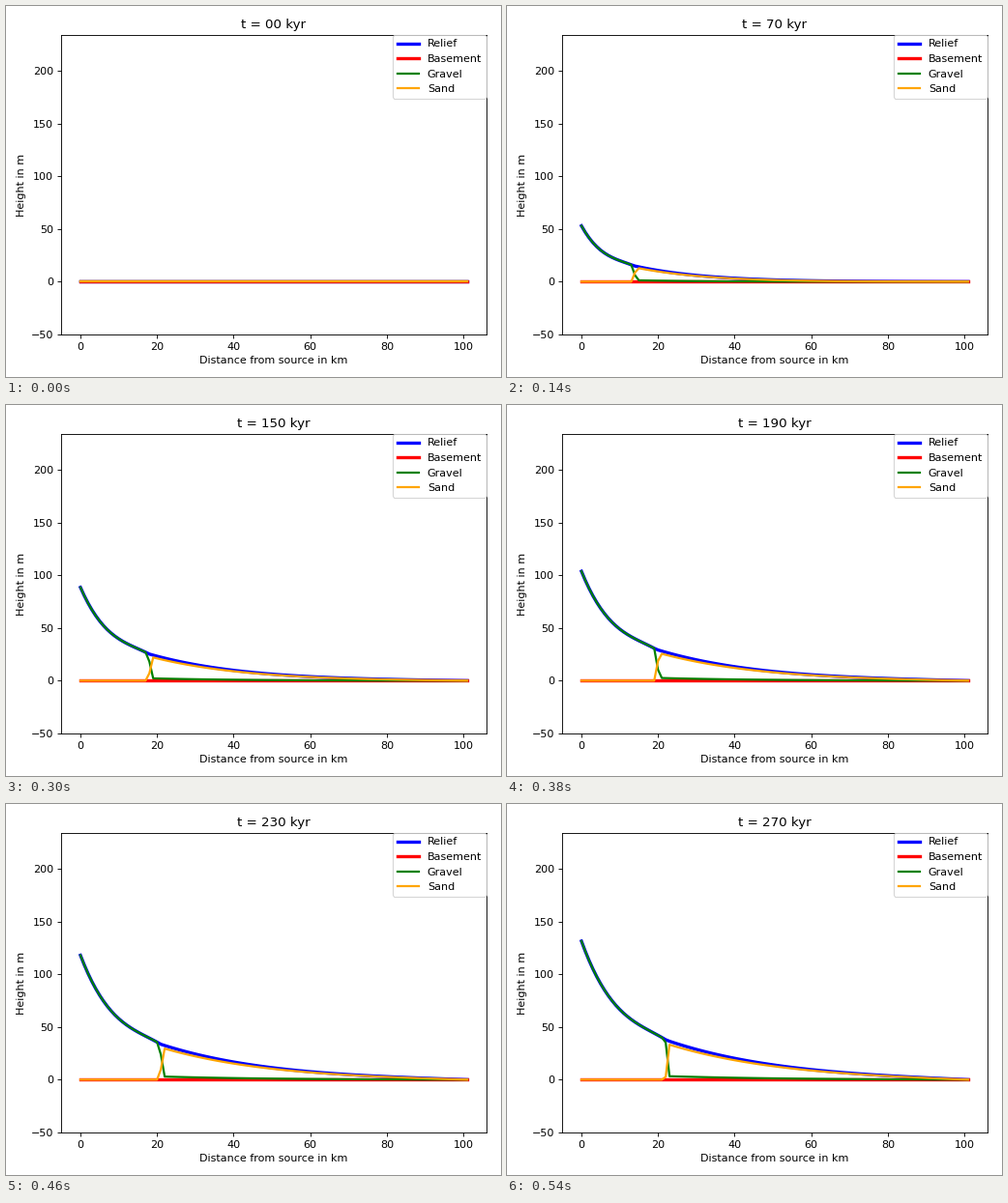
Animation of 512 by 384 pixels, one loop 560 ms. Source, as a matplotlib script:

```python
import matplotlib.pyplot as plt
import numpy as np
from matplotlib.animation import FuncAnimation

W, H, DPI = 512, 384, 80
FRAMES, INTERVAL = 28, 20
KYR_PER_FRAME = 10
LENGTH = 101            # km
TAIL = 0.09             # gravel share downstream of the front

plt.rcParams["font.family"] = "DejaVu Sans"
x = np.arange(LENGTH + 1.0)


def profile(xi):
    """Self-similar relief: steep gravel wedge, then a flatter sand apron."""
    wedge = 1 - 1.7 * xi + 1.635 * xi**2 - 0.65 * xi**3
    d = np.maximum(xi - 1, 0)
    apron = 0.285 * np.exp(-0.74 * d - 0.025 * d**2)
    return np.where(xi < 1, wedge, apron)


def layers(t):
    """Relief, gravel and sand heights in m after t kyr."""
    if t == 0:
        zero = np.zeros_like(x)
        return zero, zero, zero
    crest = 53 * (t / 70) ** 0.673
    front = 14.35 * (t / 70) ** 0.347
    reach = front - 0.7
    # the mirrored term holds the far end at zero
    relief = crest * (profile(x / reach) - profile((2 * LENGTH - x) / reach))
    filled = np.clip(front - x, 0, 1)
    share = filled + (1 - filled) * TAIL
    return relief, relief * share, relief * (1 - share)


fig = plt.figure(figsize=(W / DPI, H / DPI), dpi=DPI)
ax = fig.add_axes([57 / W, 44.1 / H, 440 / W, 309.9 / H])
ax.set_xlim(-0.05 * LENGTH, 1.05 * LENGTH)
ax.set_ylim(-50, 234)
ax.set_xlabel("Distance from source in km")
ax.set_ylabel("Height in m")
title = ax.set_title("t = 00 kyr")

flat = np.zeros_like(x)
relief_line, = ax.plot(x, flat, color="blue", lw=3, label="Relief")
ax.plot(x, flat, color="red", lw=3, label="Basement")
gravel_line, = ax.plot(x, flat, color="green", lw=2, label="Gravel")
sand_line, = ax.plot(x, flat, color="orange", lw=2, label="Sand")
ax.legend(loc="upper left", bbox_to_anchor=(0.78, 1), borderaxespad=0)


def update(i):
    t = i * KYR_PER_FRAME
    lines = relief_line, gravel_line, sand_line
    for line, height in zip(lines, layers(t)):
        line.set_ydata(height)
    title.set_text(f"t = {t:02d} kyr")
    return (*lines, title)


anim = FuncAnimation(fig, update, frames=FRAMES, interval=INTERVAL,
                     repeat=True, repeat_delay=0, blit=False)
plt.show()
```
